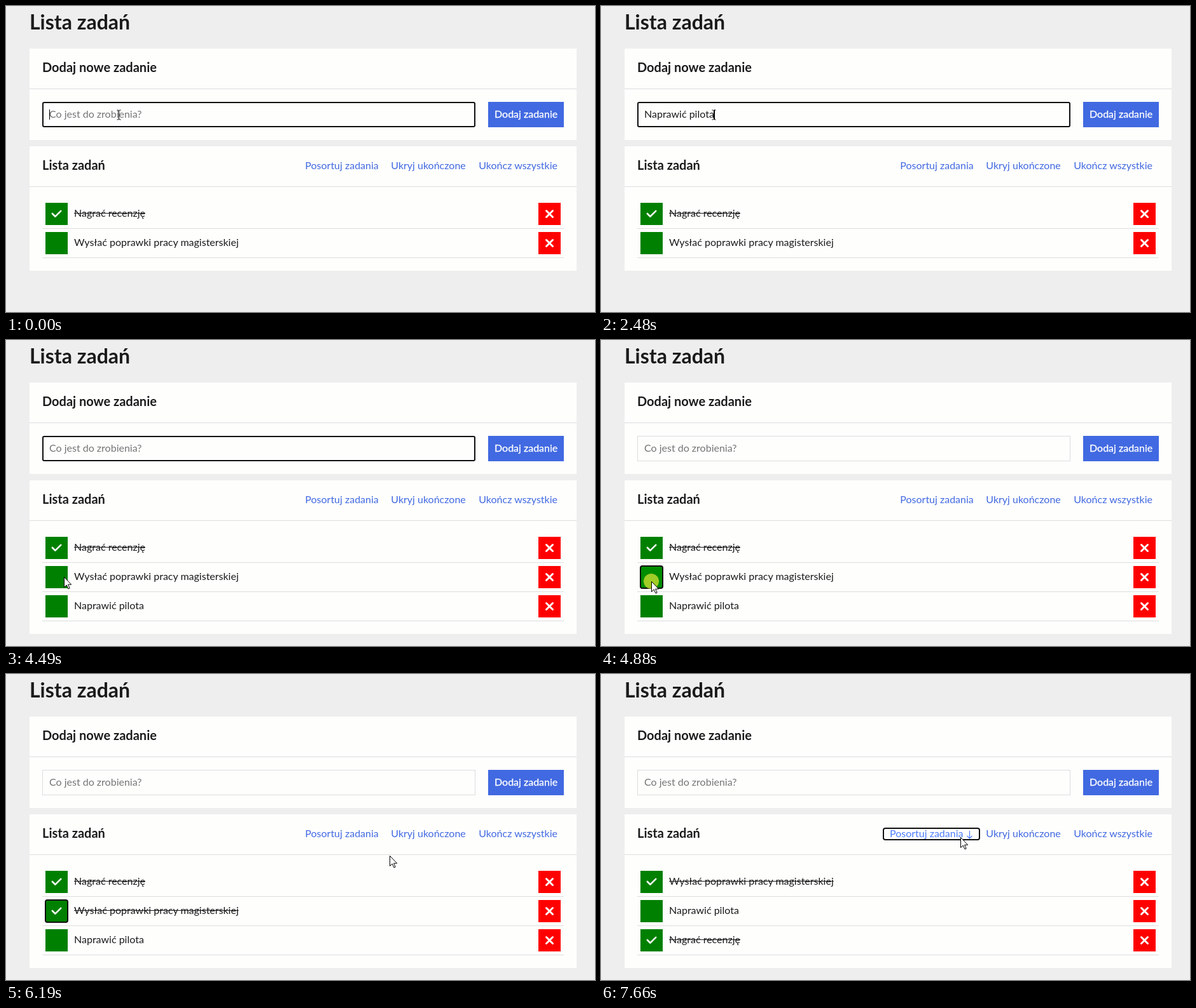
An HTML page that plays this animation: 926 px wide and 482 px high, repeating every 8000 ms.

```html
<!DOCTYPE html>
<html lang="pl">
<head>
<meta charset="utf-8">
<title>Lista zadań</title>
<style>
html, body { margin: 0; width: 100%; height: 100%; overflow: hidden; background: #eee; }
svg { display: block; width: 926px; height: 482px; font: 16px Lato, "Open Sans", sans-serif; fill: #1b1b1b; }
.card { fill: #fefefd; }
.rule { fill: #ddd; }
.head { font-size: 20px; font-weight: 700; }
.link { fill: #4169e1; text-anchor: end; }
.icon { fill: none; stroke: #fff; stroke-linecap: round; stroke-linejoin: round; }
.ring { fill: none; stroke: #101010; stroke-width: 2; }
.task { font: 16px/19px Lato, "Open Sans", sans-serif; color: #1b1b1b; white-space: nowrap; }
.done { text-decoration: line-through; }
</style>
</head>
<body>
<svg viewBox="0 0 926 482">
  <rect width="926" height="482" fill="#eee"/>
  <text x="37" y="37" font-size="32" font-weight="700">Lista zadań</text>

  <rect class="card" x="37" y="67" width="860" height="144"/>
  <rect class="rule" x="37" y="130" width="860" height="1"/>
  <text class="head" x="57" y="104">Dodaj nowe zadanie</text>
  <rect id="border" x="57.5" y="151.5" width="680" height="39" fill="none" stroke="#ddd"/>
  <rect id="inputRing" class="ring" x="58" y="152" width="679" height="38" rx="2"/>
  <text id="field" x="68" y="176" style="white-space: pre"></text>
  <rect id="caret" y="163" width="1" height="16" fill="#000"/>
  <rect x="758" y="151" width="119" height="40" fill="#4169e1"/>
  <text x="768" y="176" fill="#fff" stroke="#fff" stroke-width=".3">Dodaj zadanie</text>

  <rect id="list" class="card" x="37" y="221" width="860" height="196"/>
  <rect class="rule" x="37" y="284" width="860" height="1"/>
  <text class="head" x="57" y="258">Lista zadań</text>
  <text id="sort" class="link" y="257">Posortuj zadania</text>
  <path id="down" d="M579.5 247V259M575.5 255L579.5 259L583.5 255" fill="none" stroke="#4e7eff" stroke-width="1.2"/>
  <text class="link" x="722.8" y="257">Ukryj ukończone</text>
  <text class="link" x="867" y="257">Ukończ wszystkie</text>
  <rect id="sortRing" class="ring" x="444" y="243" width="151" height="18" rx="3"/>

  <g id="rows"></g>
  <rect id="checkRing" class="ring" x="62" y="356" width="35" height="35" rx="3"/>

  <circle id="press" r="12" fill="#f8f03c" opacity=".65"/>
  <path id="beam" d="M-3 -7.5H-1L0 -6.5L1 -7.5H3M0 -6.5V6.5M-3 7.5H-1L0 6.5L1 7.5H3" fill="none" stroke="#000"/>
  <path id="arrow" d="M.5 .5V16.5L4.2 13L7 19L9.2 18L6.6 12.2H11.7Z" fill="#fff" stroke="#000"/>
</svg>
<script>
const LOOP = 8000;
const WORD = 'Naprawić pilota';
const SUBMIT = 2940, MOVE = 3940, STEP = 77.4;
const CHECK_DOWN = 4790, CHECK = 4940, SORT_DOWN = 6720, SORT = 6950;

// Key points: time, then values
const TYPING = [[530, 1], [1000, 5], [1550, 8], [1780, 11], [2480, 15]];
const POINTER = [
  [MOVE, 178, 171], [4480, 91, 373], [4700, 79, 380], [CHECK, 79, 380],
  [5480, 215, 380], [5610, 230, 388], [6180, 603, 286], [6800, 567, 257], [7600, 565, 257]
];

const $ = id => document.getElementById(id);
const show = (id, on) => $(id).setAttribute('visibility', on ? 'visible' : 'hidden');
const set = (id, attrs) => {
  for (const key in attrs) $(id).setAttribute(key, attrs[key]);
};
const within = (t, from, to) => t >= from && t < to;
const linear = k => k;
const smooth = k => k * k * (3 - 2 * k);

function along(points, t, ease) {
  const next = points.findIndex(p => p[0] > t);
  if (next < 0) return points.at(-1).slice(1);
  const b = points[next], a = points[next - 1] ?? b;
  const k = a === b ? 0 : ease((t - a[0]) / (b[0] - a[0]));
  return a.slice(1).map((v, i) => v + (b[i + 1] - v) * k);
}

function row({ name, done, hover }, i) {
  const y = 310 + 46 * i;
  return `<rect x="62" y="${y}" width="35" height="35" fill="${hover ? '#008c00' : '#008000'}"/>
    ${done ? `<path class="icon" stroke-width="2.6" d="M72.9 ${y + 17}l4.5 4.6l8.8 -8.7"/>` : ''}
    <foreignObject x="107" y="${y + 6}" width="400" height="24">
      <div class="task"><span class="${done ? 'done' : ''}">${name}</span></div>
    </foreignObject>
    <rect x="837" y="${y}" width="35" height="35" fill="#f00"/>
    <path class="icon" stroke-width="3" d="M849.5 ${y + 12.5}l10 10m0 -10l-10 10"/>
    <rect class="rule" x="57" y="${y + 40}" width="820" height="1"/>`;
}

let lastRows = '';
function drawRows(t) {
  let tasks = [
    { name: 'Nagrać recenzję', done: true },
    { name: 'Wysłać poprawki pracy magisterskiej', done: t >= CHECK, hover: within(t, 4560, 5650) }
  ];
  if (t >= SUBMIT) tasks.push({ name: WORD });
  if (t >= SORT) tasks = [...tasks.slice(1), tasks[0]];
  const html = tasks.map(row).join('');
  if (html !== lastRows) $('rows').innerHTML = lastRows = html;
  set('list', { height: 104 + 46 * tasks.length });
}

function drawInput(t) {
  const typing = within(t, TYPING[0][0], SUBMIT);
  const field = $('field');
  const text = typing ? WORD.slice(0, along(TYPING, t, linear)[0]) : 'Co jest do zrobienia?';
  if (field.textContent !== text) field.textContent = text;
  set('field', { fill: typing ? '#1b1b1b' : '#757575' });
  set('caret', { x: Math.round(68 + (typing ? field.getComputedTextLength() : 0)) });
  show('caret', t < 460 || typing || within(t, SUBMIT, 3490) || within(t, MOVE, 4480));
  show('inputRing', t < CHECK_DOWN);
  show('border', t >= CHECK_DOWN);
}

function drawPointer(t) {
  const held = MOVE + Math.floor((t - MOVE) / STEP) * STEP;
  const [x, y] = along(POINTER, held, smooth).map(Math.round);
  const beam = y < 191;
  show('beam', beam);
  show('arrow', !beam);
  set('beam', { transform: `translate(${x - 0.5} ${y + 0.5})` });
  set('arrow', { transform: `translate(${x} ${y})` });
  set('press', { cx: x, cy: y });
  show('press', within(t, CHECK_DOWN, CHECK) || within(t, SORT_DOWN, SORT));
}

function render(t) {
  const sorted = t >= SORT;
  drawRows(t);
  drawInput(t);
  drawPointer(t);
  set('sort', { x: sorted ? 569.5 : 585.8, style: t >= SORT_DOWN ? 'fill: #4e7eff' : '' });
  show('down', sorted);
  show('sortRing', sorted);
  show('checkRing', t >= CHECK_DOWN && !sorted);
}

let origin;
function frame(now) {
  origin ??= now;
  render((now - origin) % LOOP);
  requestAnimationFrame(frame);
}
render(0);
requestAnimationFrame(frame);
</script>
</body>
</html>
```
